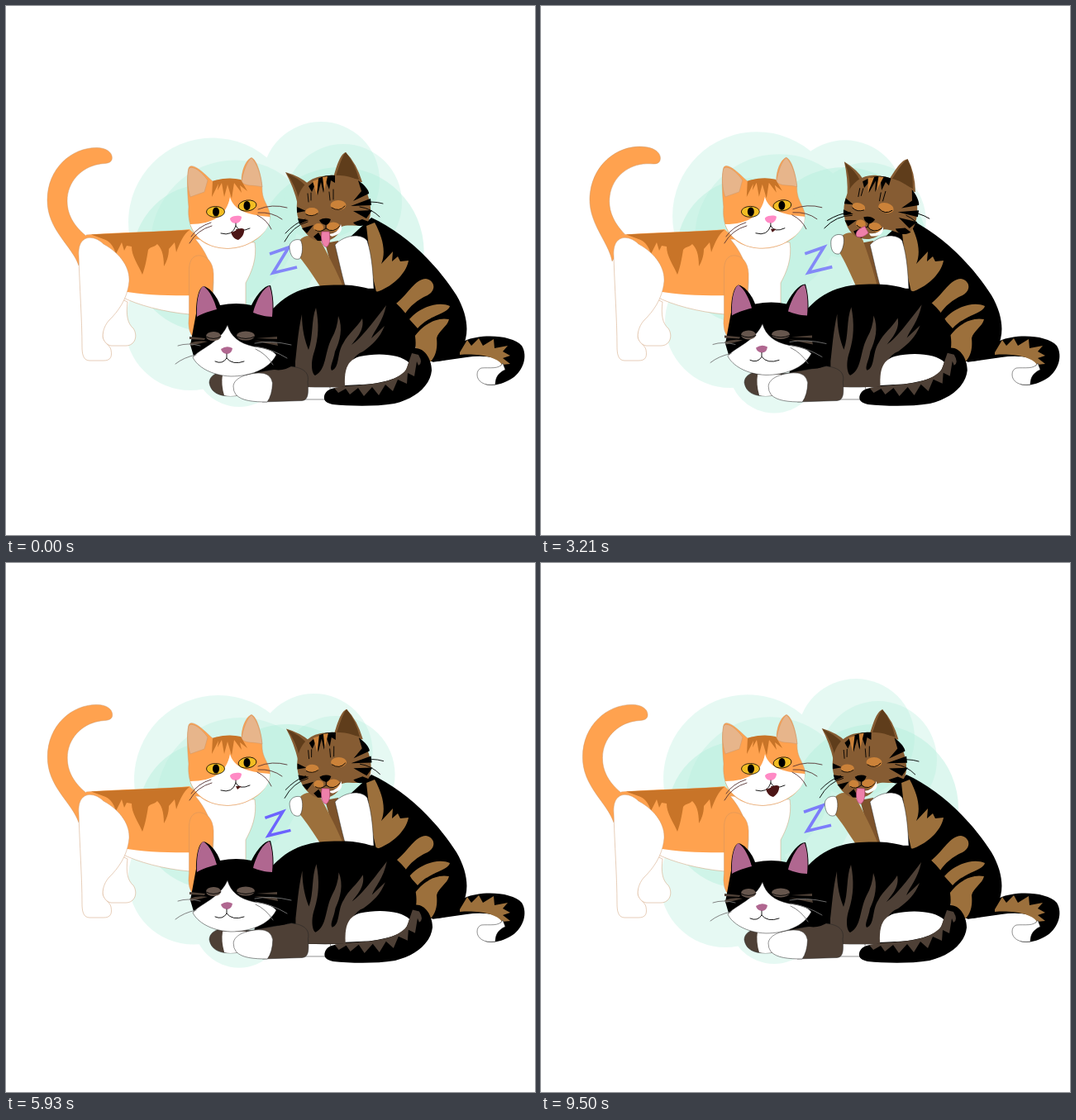
Recreate the animation shown at these times as an HTML page. Size 640 by 640 pixels, loop 9570 ms.

```html
<!DOCTYPE html>
<html lang="en">
<head>
<meta charset="utf-8">
<title>Three cats</title>
<style>
  html, body { margin: 0; width: 100%; height: 100%; overflow: hidden; background: #fff; }
  svg { display: block; width: 100vw; height: 100vh; }
  .orange { fill: #ffa24f; }
  .rust { fill: #c87428; }
  .white { fill: #fff; }
  .cocoa { fill: #4e4036; }
  .mauve { fill: #b06790; }
  .tan { fill: #9c703c; }
  .fur { fill: #865c33; }
  .amber { fill: #cb8239; }
  .line { fill: none; stroke: #000; stroke-width: .9; stroke-linecap: round; }
  .edge { stroke: #c99263; stroke-width: .45; }
  .thin { stroke: #222; stroke-width: .5; }
  .mint { fill: #b4eedc; opacity: .33; }
  .deep { opacity: .45; }
</style>
</head>
<body>
<svg viewBox="0 0 640 640">
  <g class="mint"><circle id="topLeft" r="102"/><circle id="topRight" r="71"/><circle id="lowLeft" r="79"/><circle id="bottom" r="55"/></g>
  <g class="mint deep"><circle id="midLeft" r="89"/><circle id="right" r="102"/></g>
  <g class="mint"><circle id="topLeft2" r="102"/><circle id="topRight2" r="71"/></g>

  <g id="orangeCat">
    <path id="orangeTail" class="orange edge" d="M88 314C80 290 50 271 50 235C50 196 80 171 110 171.500C122 171.500 130 178 128 186C126 191.500 118 190 112 191.500C92 195 74 212 74 236C74 255 85 270 102 282Z"/>
    <path class="white edge" d="M134 352L147 358C145 374 147 384 154 390C160 399 156 411 145 411H127C115 408 116 398 118 388Z"/>
    <path class="white edge" d="M97 277L222 271L250 300L240 352L222 373C190 370 160 362 140 352Z"/>
    <path class="orange" d="M97 277C140 273 190 274 222 270L246 292L250 330L238 350C205 351 170 350 140 345L96 290Z"/>
    <path class="rust" d="M103 276.500L222 271C215 276 211 285 206 298L204 286L197 294C197 303 194 310 191 315C191 300 188 293 183 288C178 293 176 290 172 295C170 308 168 317 165 325C160 313 152 303 152 291L146 290L143 296L140 286L133 300C130 290 125 284 118 282Z"/>
    <path class="white edge" d="M88 303C86 276 106 276 118 288C140 300 150 318 149 333C147 355 135 370 125 380C120 385 117 393 117 400C118 408 126 410 127 416C129 426 125 429 118 429H101C93 429 92 420 92 412C92 380 89 340 88 303Z"/>
    <path class="white edge" d="M229 282C240 295 250 312 251 335L249 380H290V335C297 322 304 306 301 286Z"/>
    <path class="orange edge" d="M221.500 322C221 304 229 301 236 302C246 304 252 313 251 330L249 360L228 402Q219 395 221.500 375Z"/>
  </g>

  <g id="orangeHead">
    <path class="orange edge" d="M221 243C219 222 219 205 221 196C223 191 230 195 234 198C242 204 247 210 250 212Q268 207 285 211C285 200 290 186 297 183.500C304 186 310 208 310 225C311 235 316 240 319 250C321 264 312 277 300 284C285 294 265 296 248 290C230 284 219 268 221 243Z"/>
    <path fill="#e7b58b" class="edge" d="M221 197C226 191 239 203 244 211L240 225L223 231C219 219 219 206 221 197ZM285 213C287 200 292 187 297 184C304 190 309 207 310 219C300 216 291 219 285 213Z"/>
    <path class="rust" d="M250 212Q268 206 284 210L292 224L283 217L285 226L276 214L273 233L268 216L264 231L261 214L256 223L257 215L249 231Z"/>
    <path class="white" d="M271 231C275 246 290 253 319 255C320 265 313 276 300 283.500C285 293.500 265 295.500 248 289.500C235 284 227 276 223 264C250 264 267 254 271 231Z"/>
    <g fill="#f3bd22" stroke="#000" stroke-width=".8"><ellipse cx="253.500" cy="249" rx="11" ry="6.500"/><ellipse cx="292" cy="241.500" rx="11" ry="6.500" transform="rotate(-8 292 241.500)"/></g>
    <ellipse cx="254" cy="249" rx="4" ry="5.500"/><ellipse cx="291.500" cy="241.500" rx="4" ry="5.500"/>
    <path fill="#ff8ac5" d="M271 257C274 253 283 253 285 255C285 260 281 263 278 263C274 263 271 260 271 257Z"/>
    <path class="line" d="M278 263V266Q274 279 260 275M278 266Q282 275 295 269"/>
    <path fill="#4c1515" d="M278 270L285 270L280 274Z"/>
    <path id="orangeMouth" fill="#4c1515" d="M272 273C276 275 282 266 288 270C289 275 285 281 281 283C276 282 273 278 272 273Z"/>
    <path class="line" style="stroke:#533" d="M305 246Q322 239 340 244M305 250Q322 249 334 258M304 253Q316 259 321 270M248 262Q232 267 224 279M249 266Q231 271 222 287"/>
  </g>

  <g id="letters" fill="none" stroke="#6c63ff" stroke-width="3.700">
    <path d="M-17-8L6-16L-13 15L16 8"/><path d="M-17-8L6-16L-13 15L16 8"/>
  </g>

  <g id="tabby">
    <path d="M515 431L555 405C575 396 613 398 624 411C632 424 625 442 613 450C600 458 590 460 580 458L601 432C596 424 575 422 557 425Z"/>
    <path class="tan" d="M549 419L558 404L563 411L572 402L577 411L590 403L591 414L607 411L601 418L610 423L601 426L610 433L600 434C594 424 570 420 549 422Z"/>
    <path class="white thin" d="M575 438C585 437 597 440 601 432L604 440C595 444 592 450 592 458C578 460 570 454 570 446Q570 440 575 438Z"/>
    <path d="M442 256C480 273 520 310 545 350C559 374 561 397 552 413C545 426 530 431 512 430L440 345L405 290Z"/>
    <path class="tan" d="M436 266L446 262C456 280 460 298 454 312L468 297L467 309L474 303L477 309L487 308C484 325 465 341 448 346L442 320ZM472 360C488 347 494 331 508 330C519 332 521 344 510 350C498 355 488 364 483 372ZM488 379C502 363 524 357 537 363C535 372 512 374 498 390ZM494 400C506 384 522 376 536 379C534 388 523 393 521 402C522 412 521 422 514 430H497Z"/>
    <path fill="#7d532b" d="M386 287L402 284L412 338H400Z"/>
    <path class="white thin" d="M398 289C410 276 430 275 437 284C443 303 444 324 445 342H411C405 320 402 305 398 289Z"/>
    <g id="tabbyArm">
      <path class="tan" d="M355 284C361 276 373 276 381 285C388 298 400 320 409 342H382C372 327 363 313 355 304Z"/>
      <path class="white thin" d="M343 293C342 286 349 281 356 283C360 288 359 302 355 306C347 308 344 301 343 293Z"/>
    </g>
    <g id="tabbyHead">
      <path class="fur" d="M338 201Q356 206 367 216L353 240Q348 219 338 201ZM395 212C399 196 404 179 411 177Q424 190 431 213Z"/>
      <path fill="#5f3d1b" d="M339 202Q354 208 363 218L354 233Q350 216 339 202ZM398 209C402 198 406 182 411 177Q422 190 427 210Q410 205 398 209Z"/>
      <path class="fur" d="M352 239C354 220 366 208 382 206C402 203 425 204 434 220C443 238 443 255 437 262C428 269 415 263 406 267C403 280 390 287 376 284C360 279 350 258 352 239Z"/>
      <path d="M366 218Q380 203 398 205V214L393 211L391 222L387 212L384 226L381 213L377 229L374 216L370 225ZM426 211C435 217 440 225 439 227L420 236L430 224ZM441 233L417 242L442 241ZM443 247L420 248L436 257ZM439 261C432 268 424 267 420 262L431 258ZM352 243L363 248L352 250ZM353 257L366 259L355 264ZM358 269L372 265L364 275ZM372 279L378 274L384 284L377 284Z"/>
      <path class="amber" d="M371 212L376 229L378 209ZM383 207L385 224L389 206Z"/>
      <path class="line" d="M365 227L366 237M369 226V235M391 225L392 235M396 222V234"/>
      <g class="amber"><ellipse cx="370" cy="249" rx="8" ry="5"/><ellipse cx="402" cy="241" rx="9.500" ry="6"/><ellipse cx="378" cy="268" rx="6" ry="5"/><ellipse cx="396" cy="267" rx="8" ry="5.500"/></g>
      <path class="line" d="M363 252Q370 256 377 251M394 244Q403 250 410 242"/>
      <path d="M379 259Q386 255 393 258Q391 264 387 265Q381 264 379 259Z"/>
      <path class="white" d="M391 276Q402 275 405 264Q409 274 397 278Q393 280 391 276Z"/>
      <path class="line" d="M387 264V269Q380 275 374 271M387 269Q396 276 404 266"/>
      <path id="tongue" fill="#ee80aa" stroke="#a33c68" stroke-width=".6" d="M382 273C380 285 384 292 388 291.500C393 288 392 278 391 273Z"/>
      <path class="line" d="M428 239Q442 235 456 239M428 243Q442 245 452 255M365 261Q347 266 337 285M362 258Q349 263 338 275"/>
    </g>
  </g>

  <g id="blackCat">
    <g id="blackBody">
      <path class="white thin" d="M360 460H392V476H360Z"/>
      <path d="M318 372C345 339 375 337 410 337.500C455 339 490 365 495 400C498 420 490 440 470 447C440 462 400 462 362 461L300 448L305 400Z"/>
      <path class="cocoa" d="M350 461V430C352 415 353 395 358 373C358 392 362 406 366 416C372 400 369 380 375 365C379 385 378 402 373 418C368 432 370 445 374 447C388 440 385 420 394 402Q401 390 402 375C408 390 404 405 398 418C396 430 391 437 394 441C404 438 400 420 408 408C414 396 424 390 431 378C434 392 424 402 418 410C430 402 446 380 460 362C456 382 446 392 442 402L458 387C452 402 444 409 432 418Q414 424 410 461Z"/>
      <path class="white" d="M410 459C409 438 414 428 428 424C450 419 478 421 488 432C489 445 470 455 450 457Z"/>
      <path d="M385 472C388 461 400 462 412 460C440 458 470 455 482 443C490 433 486 421 494 414C507 413 515 428 515 441C513 460 495 475 470 481C445 485 415 484 395 482C387 480 384 477 385 472Z"/>
      <path class="cocoa" d="M397 462L410 460C446 458 472 455 484 440L491 420L499 422Q505 432 499 435L497 430L494 448L486 444L485 457L474 452L468 466L459 458L451 471L443 461L433 472L426 462L416 470L411 463L402 468Z"/>
      <path class="cocoa thin" d="M246 456C246 447 255 442 272 441L300 446L290 470C268 474 249 473 246 456Z"/>
      <path class="white" d="M262 446L300 446L282 471Q270 473 264 471Q260 458 262 446Z"/>
      <path class="cocoa thin" d="M290 446L345 436C362 438 367 445 365 455C366 468 366 477 358 477.500L310 479Z"/>
      <path class="white thin" d="M275 460C276 450 290 445 305 444Q320 443 322.500 456Q322 471 316 479C300 479 285 478 278 470Q275 466 275 460Z"/>
    </g>
    <g id="blackHead">
      <path d="M223 410L230 372C230 355 233 341 239 339C248 341 256 353 259 362Q279 358 297 362C303 350 312 338 320 338C324 352 324 366 323 376C330 386 331 402 328 417L346 435Q335 444 315 438L228 427Z"/>
      <path class="mauve" d="M231 376C230 355 234 341 239 339C247 345 252 356 255 367C247 369 237 372 231 376ZM299 371C303 355 312 340 319 339C323 350 323 365 322 376C313 376 305 373 299 371Z"/>
      <path class="cocoa" d="M222 400L241 402L240 404L222 403ZM222 408Q232 404 244 406L224 411ZM303 402L328 400L328 403ZM300 405L328 407L329 411Z"/>
      <path class="white thin" d="M268 386C272 400 282 408 300 412C315 414 322 416 327 422C318 440 295 448 272 448C248 447 231 436 226 425C235 414 258 408 268 386Z"/>
      <g fill="#66564d"><ellipse cx="251" cy="399.500" rx="9" ry="5.500"/><ellipse cx="290" cy="399" rx="11" ry="5.500"/></g>
      <path class="line" d="M242 400Q251 405 260 400M279 400Q290 405 301 400"/>
      <path class="mauve" d="M260 415Q267 410 274 414Q273 421 267 421Q261 420 260 415Z"/>
      <path class="line" d="M267 421V426Q262 434 253 430M267 426Q274 435 288 430"/>
      <path class="line" style="stroke:#777" d="M235 411Q220 407 208 411M230 422Q215 425 205 433M301 408Q320 404 345 410M302 412Q322 415 340 426M302 415Q315 421 323 434"/>
    </g>
  </g>
</svg>
<script>
const LOOP = 9570;
const $ = id => document.getElementById(id);
const place = (id, transform) => $(id).setAttribute('transform', transform);
const clamp = x => Math.max(0, Math.min(1, x));
const cosine = turns => Math.cos(2 * Math.PI * turns);
const wave = turns => (1 - cosine(turns)) / 2;
// 1 near an instant, fading to 0 further away.
const near = (distance, reach, fade) => wave(clamp((reach - distance) / fade) / 2);

function drawBackdrop(loop) {
  const slow = cosine(loop), fast = cosine(2 * loop);
  const x = 257.5 - 7.5 * fast, y = 258.5 + 4.5 * cosine(2 * loop - .13);
  const rightX = 372 + 9 * fast, rightY = 226 - 10 * fast - 5 * slow;
  place('topLeft', `translate(${x} ${y})`);
  place('topLeft2', `translate(${x + 27} ${y + 27})`);
  place('topRight', `translate(${rightX} ${rightY})`);
  place('topRight2', `translate(${rightX + 27} ${rightY + 27})`);
  place('midLeft', `translate(${x - 8} ${y + 43})`);
  place('lowLeft', `translate(${227 - 4 * fast} ${384 + 2 * slow})`);
  place('bottom', `translate(282 ${435 - 5 * fast})`);
  place('right', `translate(${372 + 34 * cosine(loop - .06)} 297)`);
}

function drawLetters(loop) {
  [...$('letters').children].forEach((letter, i) => {
    const age = 6 * loop % 1 + i;
    const scale = Math.min(1, .15 + 1.1 * age);
    letter.setAttribute('transform', `translate(${312.5 + 23.5 * age} ${336 - 28 * age}) scale(${scale})`);
    letter.setAttribute('opacity', clamp(Math.min(1.5 * age, 1.6 * (1.47 - age))));
  });
}

function drawOrangeCat(t, sway) {
  place('orangeTail', `rotate(${11.5 * sway} 124 298)`);
  const tilt = near(Math.abs(t - 4250), 1150, 900);
  place('orangeHead', `translate(${-2 * tilt} ${-4 * tilt}) rotate(${-3 * tilt} 270 290)`);
  const open = near(Math.min(t, LOOP - t), 600, 400);
  place('orangeMouth', `translate(280 270) scale(${open}) translate(-280 -270)`);
}

function drawTabby(lick, sway) {
  const nod = wave(lick ** 1.36);
  place('tabbyArm', `rotate(${13 * sway} 395 338)`);
  place('tabbyHead', `translate(0 ${2 * sway}) rotate(${17.5 * nod} 403 297)`);
  place('tongue', `translate(387 273) rotate(${50 * nod}) scale(1 ${1 - .6 * sway ** 3}) translate(-387 -273)`);
}

function drawBlackCat(breath) {
  place('blackHead', `translate(0 ${-2 * breath})`);
  place('blackBody', `translate(${-.8 * breath} ${-3.6 * breath}) scale(${1 + .0035 * breath} ${1 + .0075 * breath})`);
}

function draw(now) {
  const t = now % LOOP, loop = t / LOOP;
  const lick = 8 * loop % 1, sway = wave(lick);
  drawBackdrop(loop);
  drawLetters(loop);
  drawOrangeCat(t, sway);
  drawTabby(lick, sway);
  drawBlackCat(wave(4 * loop));
  requestAnimationFrame(draw);
}
draw(0);
</script>
</body>
</html>
```
